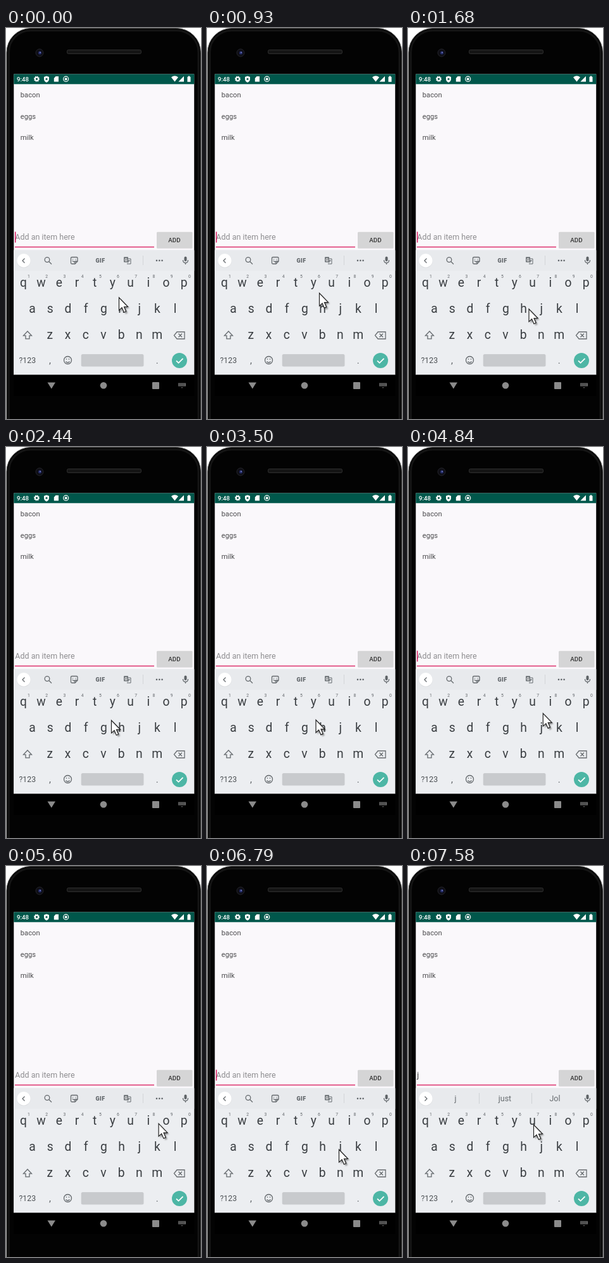
Recreate the animation shown at these times as an HTML page. Size 308 by 615 pixels, loop 8000 ms.

```html
<!DOCTYPE html>
<html lang="en">
<head>
<meta charset="utf-8">
<title>Shopping list</title>
<style>
  html, body { margin: 0; width: 100%; height: 100%; overflow: hidden; background: #fff; }
  svg { display: block; width: 308px; height: 615px; }
  text { font-family: Roboto, Arial, sans-serif; }
  .mid { text-anchor: middle; }
  .line { fill: none; stroke: #656a6e; stroke-width: 1.3; }
</style>
</head>
<body>
<svg viewBox="0 0 308 615">
  <defs>
    <filter id="soft" x="-50%" y="-50%" width="200%" height="200%"><feGaussianBlur stdDeviation="1.2"/></filter>
    <path id="arrow" d="M0 0V20L4.6 15.8 7.8 23.3 11.2 21.8 8 14.5H14Z"/>
  </defs>

  <!-- phone body -->
  <rect x="1" y=".5" width="306.5" height="660" rx="38" fill="#030303" stroke="#4a4a4a"/>
  <rect x="4.5" y="4" width="299.500" height="660" rx="34" fill="none" stroke="#141414" stroke-width="3"/>
  <rect x="96.500" y="34.500" width="117" height="6" rx="2" fill="#151515" stroke="#303030"/>
  <circle cx="53" cy="39" r="6" fill="#0e0e15" stroke="#24242a"/>
  <circle cx="53.500" cy="39" r="2.600" fill="#222a66"/>
  <circle cx="54" cy="38.500" r="1" fill="#7a84c0"/>

  <!-- app -->
  <rect x="12.300" y="72.500" width="284.900" height="473" fill="#faf8fb"/>
  <rect x="12.300" y="72.500" width="284.900" height="15.800" fill="#00574b"/>
  <g fill="#fff">
    <text x="17" y="83.700" font-size="9.700" font-weight="500">9:48</text>
    <circle cx="48.500" cy="80.200" r="2.600" fill="none" stroke="#fff" stroke-width="2"/>
    <circle cx="48.500" cy="80.200" r="3.900" fill="none" stroke="#fff" stroke-width="1.200" stroke-dasharray="1.700 1.360"/>
    <path d="M64 75.500l4 1.600v3.200q0 3.600-4 5.400q-4-1.800-4-5.400v-3.200z"/>
    <circle cx="64" cy="80.200" r="1.500" fill="#00574b"/>
    <path d="M78.500 76H83v8.500H75.800V79z"/>
    <circle cx="94.700" cy="80.200" r="4" fill="none" stroke="#fff" stroke-width="1.200"/>
    <circle cx="94.700" cy="80.200" r="2"/>
    <path d="M261 77.500q5.500-4.500 11 0l-5.500 7z"/>
    <path d="M281 75.800v8.700h-8.700z"/>
    <path d="M286.500 76.700h1.300v-1.200h2.400v1.200h1.300v8h-5z"/>
  </g>
  <g fill="#4b4b4d" font-size="11.200">
    <text x="22.800" y="109.200">bacon</text>
    <text x="22.800" y="142.700">eggs</text>
    <text x="22.800" y="176.200">milk</text>
  </g>
  <text id="entry" x="14.300" y="333.200" font-size="12.500"></text>
  <path d="M14 344.600H234" stroke="#dc2f6c" stroke-width="1.500"/>
  <rect id="caret" y="320.500" width="1.500" height="17" fill="#d81b60"/>
  <rect x="238" y="320.700" width="56.500" height="26" rx="1.500" fill="#d5d5d6"/>
  <text class="mid" x="266" y="336.800" font-size="9.800" font-weight="500" fill="#333">ADD</text>

  <!-- keyboard -->
  <rect x="12.300" y="349.500" width="284.900" height="196" fill="#eceef1"/>
  <rect x="12.300" y="349.500" width="284.900" height="32.500" fill="#e8eaed"/>
  <circle cx="28" cy="366.300" r="11" fill="#d9dbde"/>
  <circle cx="28" cy="365.700" r="10.700" fill="#fff"/>
  <path id="chevron" class="line"/>
  <g id="tools">
    <g class="line">
      <circle cx="65" cy="364.500" r="3.800"/>
      <path d="M68 367.500l4 4"/>
      <path d="M104 360.500h7.500q1.500 0 1.500 1.500v5l-4 4h-5q-1.500 0-1.500-1.500V362q0-1.500 1.500-1.500zM113 367h-4v4M105 366q1.500 2.500 4 1.500M105.500 363.500v1M110 363.500v1"/>
      <path d="M192 363h5v8h-6M192.500 366h3.500M194 365q0 3-2 4.500" stroke-width="1"/>
    </g>
    <rect x="186" y="360" width="7" height="8.500" rx="1" fill="#73787c"/>
    <text class="mid" x="189.500" y="366.700" font-size="6.500" font-weight="700" fill="#eee">G</text>
    <text class="mid" x="149" y="368.700" font-size="9" font-weight="900" letter-spacing=".4" fill="#5d6266">GIF</text>
    <path d="M216.500 358v15" stroke="#d3d6d9"/>
    <g fill="#5d6266">
      <circle cx="238" cy="365.700" r="1.300"/><circle cx="242.300" cy="365.700" r="1.300"/><circle cx="246.600" cy="365.700" r="1.300"/>
    </g>
  </g>
  <g id="hints" class="mid" font-size="12.500" fill="#666b6f">
    <text x="75" y="370">j</text>
    <text x="153" y="370">just</text>
    <text x="232" y="370">Jol</text>
    <path d="M112.500 357v17M195.500 357v17" stroke="#cfd2d5"/>
  </g>
  <rect x="281.500" y="359.500" width="4" height="7.500" rx="2" fill="#5d6266"/>
  <path class="line" d="M279.500 365q0 4.500 4 4.500t4-4.500M283.500 369.500v2.500"/>

  <g id="keys" class="mid"></g>
  <path class="line" d="M34 477l-6.500 6.800h3.500v5h6v-5h3.500z"/>
  <path class="line" d="M270 478h12v11h-12l-4.500-5.500zM272.500 480.800l5.500 5.500M278 480.800l-5.500 5.500"/>
  <text x="20.500" y="527" font-size="12.300" fill="#4c5054">?123</text>
  <g class="mid" font-size="15" fill="#5c6064">
    <text x="69.500" y="528">,</text>
    <text x="238.700" y="527.500">.</text>
  </g>
  <g class="line">
    <circle cx="97.500" cy="522.500" r="6"/>
    <path d="M94.500 524.500q3 3.500 6 0M95.500 520v1.600M99.500 520v1.600"/>
  </g>
  <rect x="118.700" y="513" width="98.800" height="19.500" rx="2.500" fill="#c8cacd"/>
  <circle cx="274" cy="523" r="12" fill="#4db6a5"/>
  <path d="M269 523.300l3.500 3.500 7-7" fill="none" stroke="#fff" stroke-width="1.800"/>

  <!-- navigation bar -->
  <rect x="12.300" y="545.500" width="284.900" height="33.500" fill="#000"/>
  <g fill="#8b8b8b">
    <path d="M65.500 557.500h12.500l-6.200 10z"/>
    <circle cx="154" cy="562.300" r="5.300"/>
    <rect x="231" y="557" width="11" height="11" rx="1"/>
    <path d="M272 558.500h12v5h-12zM276.500 565h3l-1.500 1.800z" opacity=".75"/>
    <path d="M273 560.200h10M273 562h10" stroke="#000" stroke-width=".8" stroke-dasharray="1 1"/>
  </g>

  <g id="pointer">
    <use href="#arrow" x="2.500" y="2.500" opacity=".4" filter="url(#soft)"/>
    <use href="#arrow" fill="#fff" stroke="#222" stroke-width="1.200"/>
  </g>
</svg>
<script>
const LOOP = 8000, TYPED_AT = 7100, PITCH = 28.2;
const $ = id => document.getElementById(id);

const label = (text, x, y, size, color) =>
  `<text x="${x}" y="${y}" font-size="${size}" fill="${color}">${text}</text>`;

const row = (letters, x, y) =>
  [...letters].map((c, i) => label(c, x + i * PITCH, y, 19.3, "#3a3e42")).join("");

$("keys").innerHTML =
  row("qwertyuiop", 27.4, 407) + row("asdfghjkl", 41.5, 447.5) + row("zxcvbnm", 69.4, 488.7) +
  [..."1234567890"].map((c, i) => label(c, 36 + i * PITCH, 393, 6.8, "#65696d")).join("");

// Screen refreshes: [first, last, count]
const bursts = [
  [0, 290, 3], [610, 1540, 7], [1680, 1840, 2], [2140, 2740, 5], [3180, 4100, 7],
  [4240, 5280, 8], [5440, 6340, 7], [6500, 6500, 1], [6790, 7580, 6]
];
const ticks = bursts.flatMap(([a, b, n]) =>
  Array.from({ length: n }, (_, i) => a + (n > 1 ? (b - a) * i / (n - 1) : 0)));

// Pointer path: [time, x, y]
const path = [
  [0, 178.5, 424], [290, 177, 420], [610, 177, 420], [930, 177.5, 417], [1540, 189, 438],
  [1680, 191, 442], [1840, 190, 441], [2140, 188, 440], [2440, 166.5, 430], [2740, 162, 429],
  [3180, 164, 429], [4240, 191.5, 430], [5600, 241.5, 405], [6340, 206, 447], [6500, 208.5, 446],
  [7100, 208.5, 446], [7580, 198.5, 407], [LOOP, 198.5, 407]
];

function pointerAt(t) {
  const i = path.findIndex(p => p[0] > t);
  const [t0, x0, y0] = path[i - 1], [t1, x1, y1] = path[i];
  const k = (t - t0) / (t1 - t0);
  return [x0 + (x1 - x0) * k, y0 + (y1 - y0) * k];
}

const show = (id, on) => $(id).setAttribute("visibility", on ? "visible" : "hidden");

function draw(time) {
  const t = ticks.findLast(tick => tick <= time + 0.5);
  const typed = t >= TYPED_AT;
  const [x, y] = pointerAt(t);
  $("pointer").setAttribute("transform", `translate(${x.toFixed(1)} ${y.toFixed(1)})`);

  $("entry").textContent = typed ? "j" : "Add an item here";
  $("entry").setAttribute("fill", typed ? "#333" : "#8f8e91");
  $("caret").setAttribute("x", typed ? 17.5 : 14);
  show("caret", typed ? t < TYPED_AT + 450 : (t + 330) % 1000 < 500);

  show("tools", !typed);
  show("hints", typed);
  $("chevron").setAttribute("d", typed ? "M26.5 362.5l3.5 3.5-3.5 3.5" : "M29.5 362.5l-3.5 3.5 3.5 3.5");
}

const start = performance.now();
function frame() {
  draw((performance.now() - start) % LOOP);
  requestAnimationFrame(frame);
}
frame();
</script>
</body>
</html>
```
